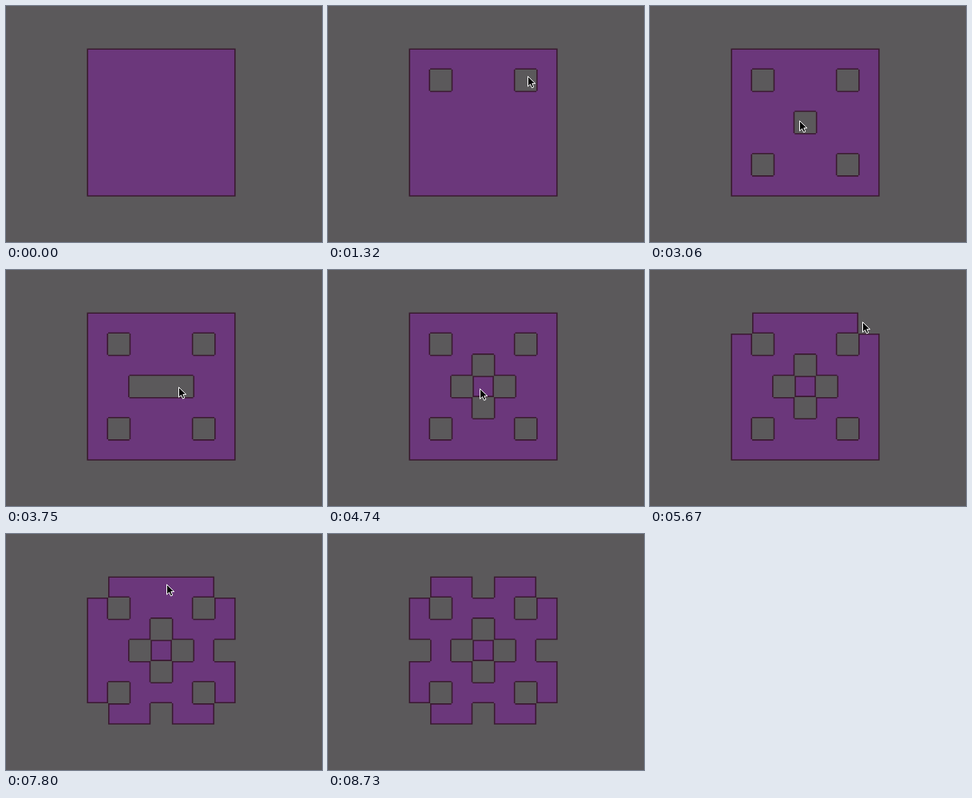
Write an HTML page with a canvas that moves like this. It is 396x297 px and loops after 9 s.

```html
<!DOCTYPE html>
<html lang="en">
<head>
<meta charset="utf-8">
<title>Cell toggling</title>
<style>
html, body { margin: 0; height: 100%; overflow: hidden; background: #5b595b; }
canvas { display: block; }
</style>
</head>
<body>
<canvas id="stage" width="396" height="297"></canvas>
<script>
const ctx = document.getElementById('stage').getContext('2d');
const LOOP = 9000, STEP = 30, N = 7, LEFT = 101.4, TOP = 53.4, CELL = 26.62, LINE = 1.6;

// Evenly timed rounds of clicks on "row column" cells; dx, dy: where in the cell the pointer lands
const rounds = [
  { start: 690, step: 590, dx: 2, dy: -5, cells: '11 15 55 51' },
  { start: 2940, step: 360, dx: -5, dy: 2, cells: '33 32 34 23 43 33' },
  { start: 5280, step: 380, dx: -8, dy: -2, cells: '00 06 66 60' },
  { start: 6870, step: 510, dx: 5, dy: -3, cells: '63 36 03 30' }
];

const clicks = rounds.flatMap(({ start, step, dx, dy, cells }) =>
  cells.split(' ').map(([r, c], i) => ({
    r, c,
    time: start + i * step,
    travel: step * 0.8,
    x: LEFT + (+c + 0.5) * CELL + dx,
    y: TOP + (+r + 0.5) * CELL + dy
  })));

const enter = { x: 185, y: 275, time: 0 };
const leave = { x: 22, y: 162, time: 8790, travel: 90 };
const stops = [enter, ...clicks, leave];

const arrow = new Path2D('M.5 .5V13.2L3.5 10.4 5.6 15 7.8 14 5.8 9.6H9.8Z');
const smooth = p => p * p * (3 - 2 * p);

// Pointer rests around each click and travels in a shallow arc between clicks
function pointerAt(t) {
  const i = Math.max(1, stops.findLastIndex((s, k) => k && t >= departure(k)));
  const from = stops[i - 1], to = stops[i], begin = departure(i);
  const p = Math.max(0, Math.min(1, (t - begin) / (to.time - 60 - begin)));
  const s = smooth(p);
  return [
    Math.round(from.x + (to.x - from.x) * s),
    Math.round(from.y + (to.y - from.y) * s - 8 * Math.sin(Math.PI * p))
  ];
}

function departure(i) {
  return Math.max(stops[i - 1].time + 75, stops[i].time - 60 - stops[i].travel);
}

function drawBoard(t) {
  const cells = Array.from({ length: N }, () => Array(N).fill(true));
  for (const { time, r, c } of clicks) if (t >= time) cells[r][c] = !cells[r][c];
  const inset = (r, c) => cells[r]?.[c] ? 0 : LINE;
  const outline = new Path2D(), body = new Path2D();

  for (let r = 0; r < N; r++) for (let c = 0; c < N; c++) {
    if (!cells[r][c]) continue;
    const x = LEFT + c * CELL, y = TOP + r * CELL;
    const l = inset(r, c - 1), u = inset(r - 1, c);
    outline.rect(x, y, CELL, CELL);
    body.rect(x + l, y + u, CELL - l - inset(r, c + 1), CELL - u - inset(r + 1, c));
  }
  ctx.fillStyle = '#3a1a30';
  ctx.fill(outline);
  ctx.fillStyle = '#6b377b';
  ctx.fill(body);
}

function drawPointer(t) {
  if (t < 240 || t >= 8730) return;
  ctx.save();
  ctx.translate(...pointerAt(t));
  ctx.fillStyle = '#000';
  ctx.strokeStyle = '#fff';
  ctx.fill(arrow);
  ctx.stroke(arrow);
  ctx.restore();
}

function render(now) {
  const t = Math.floor((now % LOOP) / STEP) * STEP;
  ctx.fillStyle = '#5b595b';
  ctx.fillRect(0, 0, 396, 297);
  drawBoard(t);
  drawPointer(t);
}

const start = performance.now();
function tick() {
  render(performance.now() - start);
  requestAnimationFrame(tick);
}
tick();
</script>
</body>
</html>
```
